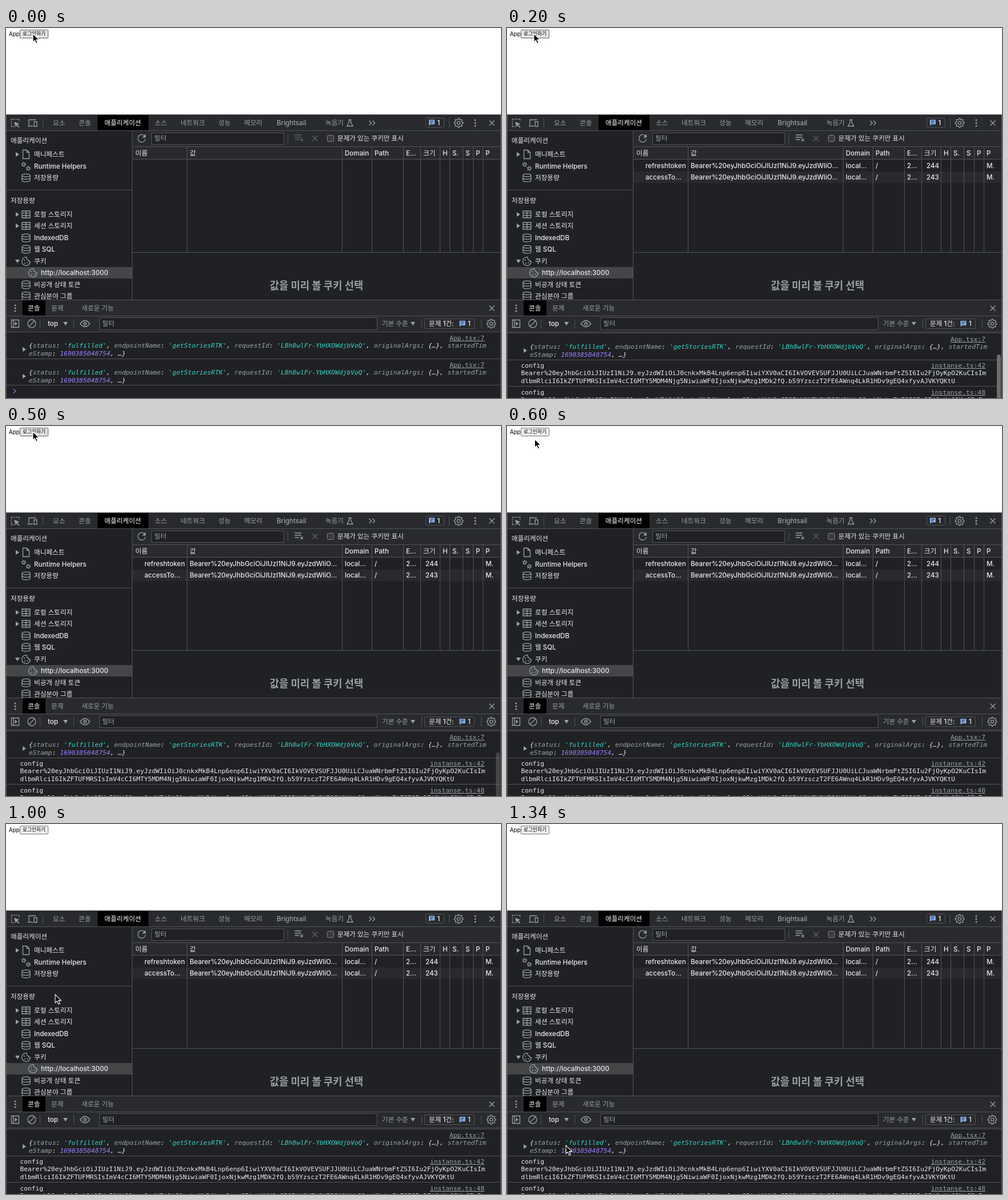
Write an HTML page that moves like this. It is 865 px wide and 647 px high and loops after 1.38 s.

```html
<!DOCTYPE html>
<html lang="ko">
<head>
<meta charset="utf-8">
<title>Login cookies</title>
<style>
html, body { margin: 0; width: 100%; height: 100%; overflow: hidden; background: #fff; }
svg { display: block; width: 865px; height: 647px; }
text { font: 500 11.6px Inter, "Noto Sans CJK KR", "Noto Sans CJK", sans-serif; white-space: pre; }
.page { font-weight: 400; }
.mono { font: 11.26px "DejaVu Sans Mono", "Liberation Mono", monospace; }
.it { font-style: italic; }
.ln { fill: none; stroke-width: 1.3; }
</style>
</head>
<body>
<svg id="stage" viewBox="0 0 865 647" xmlns="http://www.w3.org/2000/svg"></svg>
<script>
const BG = '#202124', BAR = '#292a2d', EDGE = '#505357', FG = '#e8eaed', DIM = '#9aa0a6';
const CYAN = '#35d4c7', VIOLET = '#9980ff', BLUE = '#8ab4f8', FRAME = '#5f6164';

// drawing helpers, each returning markup
const rect = (x, y, w, h, fill, more = '') =>
  `<rect x="${x}" y="${y}" width="${w}" height="${h}" fill="${fill}" ${more}/>`;
const hline = (y, x = 0, w = 865 - x, c = EDGE) => rect(x, y, w, 1, c);
const vline = (x, y, h, c = EDGE) => rect(x, y, 1, h, c);
const text = (x, mid, s, fill = FG, more = '') =>
  `<text x="${x}" y="${mid + 4.4}" fill="${fill}" ${more}>${s}</text>`;
const mono = (x, mid, s, fill = FG, cls = '') =>
  `<text class="mono ${cls}" x="${x}" y="${mid + 4}" fill="${fill}">${s}</text>`;
const path = (d, c = DIM, more = '') => `<path class="ln" d="${d}" stroke="${c}" ${more}/>`;
const solid = (d, c = DIM) => `<path d="${d}" fill="${c}"/>`;
const at = (x, y, s) => `<g transform="translate(${x} ${y})">${s}</g>`;
const group = (id, s) => `<g id="${id}">${s}</g>`;
const ring = (r, c = DIM) => `<circle class="ln" r="${r}" stroke="${c}"/>`;
const dot = (x, y, r, c = DIM) => `<circle cx="${x}" cy="${y}" r="${r}" fill="${c}"/>`;

// icons, centred on 0,0
const cross = (r, c) => path(`M${-r} ${-r}L${r} ${r}M${r} ${-r}L${-r} ${r}`, c);
const kebab = [-5, 0, 5].map(y => dot(0, y, 1.5)).join('');
const right = solid('M-3 -4L3.2 0L-3 4Z');
const down = solid('M-4 -3L4 -3L0 3.2Z');
const file = path('M-5.5 -7.5H1.5L5.5 -3.5V7.5H-5.5ZM1.5 -7.5V-3.5H5.5');
const disk = path('M-7 -4.5C-7 -7.7 7 -7.7 7 -4.5V4.5C7 7.7 -7 7.7 -7 4.5ZM-7 -4.5C-7 -1.3 7 -1.3 7 -4.5M-7 0C-7 3.2 7 3.2 7 0');
const grid = path('M-7 -6H7V6H-7ZM-7 -2.3H7M-7 2H7M0 -6V6');
const cookie = path('M1 -7.3A7.4 7.4 0 1 0 7.4 0.5Q5 .8 4.4 -2Q1 -2.5 1 -7.3Z') +
  dot(-3, -2, 1.1) + dot(-2, 3, 1.1) + dot(2.5, 2.5, 1.1);
const gear = (r, n = 8) => {
  let d = '';
  for (let i = 0; i < n * 4; i++) {
    const a = (i - .5) * Math.PI / n / 2, q = i % 4 < 2 ? r : r * .78;
    d += `${i ? 'L' : 'M'}${(q * Math.cos(a)).toFixed(2)} ${(q * Math.sin(a)).toFixed(2)}`;
  }
  return path(d + 'Z') + ring(r * .34);
};
const cog = ring(2.3) + `<circle class="ln" r="3.6" stroke="${DIM}" stroke-dasharray="1.6 2.17"/>`;
const chat = solid('M-5 -5H5V3H-2.5L-5 5.5Z', BLUE) + path('M-3 -2.6H3M-3 .4H1.5', BAR);
const inspect = path('M-6.5 -6.5H7', DIM, 'stroke-dasharray="2 1.7"') +
  path('M-6.5 -6.5V7M7 -6.5V-2M-6.5 6.5H-1', DIM, 'stroke-dasharray="2 1.7"') +
  solid('M-2 -2L7.5 1.5L3.6 3L7.5 7L6.3 8.2L2.4 4.2L1 7.5Z');
const device = path('M-6 4V-5.5H6.5M-8 5.5H1M3 -2H8V6H3Z');
const flask = path('M-2.5 -5.5H2.5M-1.5 -5.5V-1L-5 5.5H5L1.5 -1V-5.5');
const reload = path('M5.2 -4.2A6.6 6.6 0 1 0 6.6 1') + solid('M7 -7.5V-1.5H1Z');
const clearList = c => path('M-7.5 -5H4M-7.5 -1H4M-7.5 3H0M2.5 1.5L7 6M7 1.5L2.5 6', c);
const eye = path('M-8.5 0Q0 -11 8.5 0Q0 11 -8.5 0Z') + ring(2.6) + dot(0, 0, 1);
const sidebar = path('M-6.5 -6.5H6.5V6.5H-6.5ZM-3 -6.5V6.5') + solid('M-.5 -3.5L4 0L-.5 3.5Z');
const ban = ring(7) + path('M-5 5L5 -5');

const page = () =>
  rect(0, 0, 865, 152, '#fff') +
  text(5, 9.2, 'App', '#000', 'class="page" style="font-size:9.9px"') +
  '<rect id="btn" x="24.5" y="3.5" width="49" height="14" rx="1.6"/>' +
  text(29, 8.9, '로그인하기', '#000', 'class="page" style="font-size:8.7px"');

const tabs = () => {
  const names = [[82, '요소'], [127, '콘솔'], [172, '애플리케이션'], [260, '소스'], [305, '네트워크'],
    [371, '성능'], [416, '메모리'], [473, 'Brightsail'], [558, '녹음기']];
  return rect(0, 152, 865, 27, BAR) + rect(160, 152, 89, 27, '#000') + hline(179) +
    at(16, 166, inspect) + at(46, 166, device) + vline(64, 158, 16) +
    names.map(([x, s]) => text(x, 166, s, x === 172 ? '#fff' : DIM)).join('') +
    at(601, 166, flask) + at(640, 166, path('M-5.5 -4L-1.5 0L-5.5 4M.5 -4L4.5 0L.5 4')) +
    rect(733.5, 157.5, 32, 16, 'none', `stroke="${EDGE}" rx="2"`) +
    at(744, 165.5, chat) + text(753.5, 165.5, '1') + vline(774, 158, 16) +
    at(791, 166, gear(7.8)) + at(820, 166, kebab) + at(849, 166, cross(4.5));
};

const tree = () => {
  const rows = [[221, file, '매니페스트', right], [242, at(-4, -3.5, cog) + at(4, 3.5, cog), 'Runtime Helpers'],
    [262, disk, '저장용량'], [326, grid, '로컬 스토리지', right], [346, grid, '세션 스토리지', right],
    [367, disk, 'IndexedDB'], [387, disk, '웹 SQL'], [408, cookie, '쿠키', down],
    [449, disk, '비공개 상태 토큰'], [468.5, disk, '관심분야 그룹']];
  return rect(0, 180, 220, 296, BG) + text(8, 197, '애플리케이션') + hline(283, 0, 220) +
    text(8, 301.5, '저장용량') + rect(0, 418, 220, 20, '#454648') +
    at(47, 428, cookie) + text(61, 428, 'http://localhost:3000') +
    rows.map(([y, icon, s, arrow]) => (arrow ? at(20, y, arrow) : '') + at(35, y, icon) + text(49, y, s)).join('') +
    vline(220, 180, 296);
};

const cols = [316, 587, 639, 694, 724, 758, 775, 798, 816, 833];
const table = () => {
  const heads = ['이름', '값', 'Domain', 'Path', 'E…', '크기', 'H', 'S.', 'S', 'P', 'P'];
  const cookies = [['refreshtoken', 240.5, 244], ['accessTo…', 261, 243]];
  return rect(221, 180, 644, 27, BAR) + at(237, 193, reload) +
    rect(254.5, 183.5, 231, 20, BG, `stroke="${EDGE}"`) + text(259, 193, '필터', DIM) +
    vline(492, 185, 16) +
    group('clearOff', at(512, 192, clearList('#5f6368'))) + group('clearOn', at(512, 192, clearList(DIM))) +
    at(540, 193, cross(4.5, '#5f6368')) +
    rect(561.5, 187.5, 11, 11, '#3b3b3b', 'stroke="#858585" rx="2"') + text(579, 193, '문제가 있는 쿠키만 표시') +
    hline(207, 221) + rect(221, 208, 644, 21, BAR) + rect(221, 230, 644, 162, BG) +
    group('cookies', rect(221, 251, 644, 20, BAR) + cookies.map(([name, y, size]) =>
      [[242, name], [321, 'Bearer%20eyJhbGciOiJIUzI1NiJ9.eyJzdWIiO…'], [592, 'local…'], [644, '/'],
        [699, '2…'], [733, size], [838, 'M.']].map(([x, s]) => text(x, y, s)).join('')).join('')) +
    hline(229, 221) + cols.map(x => vline(x, 208, 184)).join('') +
    heads.map((s, i) => text(i ? cols[i - 1] + 5 : 226, 219, s)).join('') +
    rect(221, 393, 644, 83, BG) + hline(392, 221) +
    text(461, 452.3, '값을 미리 볼 쿠키 선택', DIM, 'style="font-size:17.7px;font-weight:700"');
};

const drawer = () =>
  rect(0, 476, 865, 55, BAR) + hline(475) + rect(29, 476, 40, 27, '#000') + hline(503) +
  at(16, 490, kebab) + text(38, 490, '콘솔', '#fff') + text(79, 490, '문제', DIM) +
  text(132, 490, '새로운 기능', DIM) + at(849, 490, cross(4.5)) +
  at(16, 517, sidebar) + at(45, 517, ban) + vline(59, 509, 16) + text(73, 517, 'top') +
  at(104, 517, down) + vline(118, 509, 16) + at(138, 517, eye) +
  rect(163.5, 506.5, 485, 21, BG, `stroke="${EDGE}"`) + text(168, 517, '필터', DIM) +
  text(657, 517, '기본 수준', DIM) + at(711, 517, down) + vline(726, 509, 16) +
  rect(731.5, 508.5, 87, 17, 'none', `stroke="${EDGE}" rx="2"`) + text(739, 517, '문제 1건:') +
  at(797.5, 517, chat) + text(807, 517, '1') + vline(830, 509, 16) + at(848, 517, gear(7.8)) + hline(531);

const link = (y, s) => {
  const x = 836 - s.length * 6.78;
  return mono(x, y, s, DIM) + hline(y + 5, x, 836 - x, DIM);
};
const span = (s, c) => `<tspan fill="${c}">${s}</tspan>`;
const pair = (key, val, c = CYAN) => span(key, DIM) + ': ' + span(val, c);
const action = y => link(y, 'App.tsx:7') + at(32, y + 20, right) +
  mono(40, y + 13.2, '{' + [pair('status', "'fulfilled'"), pair('endpointName', "'getStoriesRTK'"),
    pair('requestId', "'LBh8wlFr-YbHXOWdjbVoQ'"), pair('originalArgs', '{…}', FG)].join(', ') +
    ', ' + span('startedTim', DIM), FG, 'it') +
  mono(40, y + 26.6, pair('eStamp', '1690385048754', VIOLET) + ', …}', FG, 'it');

const token = [
  'Bearer%20eyJhbGciOiJIUzI1NiJ9.eyJzdWIiOiJ0' + 'cnkxMkB4Lnp6enp6' + 'IiwiYXV0aCI6IkVOVEVSUFJJU0UiLCJuaWNrbmFtZSI6Iu2FjOyKpO2KuCIsIm',
  'dlbmRlciI6IkZFTUFMRSIsImV4cCI6MTY5MDM4Njg5NiwiaWF0IjoxNjkwMzg1MDk2fQ' + '.b59YzsczT2FE6AWnq4LkR1HDv9gEQ4xfyvAJVKYQKtU'];
const config = (y, line) => link(y, 'instanse.ts:' + line) + mono(24.5, y, 'config') +
  token.map((s, i) => mono(24.5, y + 13.4 * (i + 1), s)).join('');

const log = () => rect(0, 532, 865, 115, BG) +
  group('before', action(542) + hline(578) + action(589) + hline(624) +
    at(15, 635, path('M-2 -3.5L2 0L-2 3.5', '#6f7fd8'))) +
  group('after', hline(533) + action(544) + hline(580) + config(590, 42) + hline(626) + config(637, 48)) +
  rect(856, 571, 7, 90, '#6b6c6e', 'id="thumb" rx="3.5"');

const frame = () => hline(151, 0, 865, FRAME) + vline(0, 152, 495, FRAME) + vline(864, 152, 495, FRAME);

const cursor = group('cursor', '<path d="M0 0V14.6L3.3 11.5L5.7 17L8.2 15.9L5.8 10.6H10.4Z" fill="#000" stroke="#fff" stroke-width="1.1"/>');

const stage = document.getElementById('stage');
stage.innerHTML = page() + tabs() + tree() + table() + drawer() + log() + frame() + cursor;

const el = id => document.getElementById(id);
const show = (id, on) => el(id).setAttribute('visibility', on ? 'visible' : 'hidden');

// pointer tip: [start ms, x, y]
const stops = [[0, 47, 10], [600, 48.5, 23], [700, 150, 105], [800, 311, 232], [900, 212, 270],
  [1000, 86, 298], [1100, 89, 440], [1200, 99, 550], [1300, 98, 535], [1340, 103, 562]];

function draw(t) {
  show('before', t < 100);
  show('after', t >= 100);
  show('cookies', t >= 200);
  show('clearOff', t < 200);
  show('clearOn', t >= 200);
  // the scroll thumb appears with the new lines, then fades out
  el('thumb').setAttribute('opacity', t < 100 || t >= 600 ? 0 : t < 500 ? 1 : .5);
  const hover = t < 600, btn = el('btn');
  btn.setAttribute('fill', hover ? '#e5e5e5' : '#efefef');
  btn.setAttribute('stroke', hover ? '#5c5c5c' : '#767676');
  const [, x, y] = stops.filter(s => s[0] <= t).pop();
  el('cursor').setAttribute('transform', `translate(${x} ${y})`);
}

const start = performance.now();
function tick() {
  draw((performance.now() - start) % 1380);
  requestAnimationFrame(tick);
}
tick();
</script>
</body>
</html>
```
